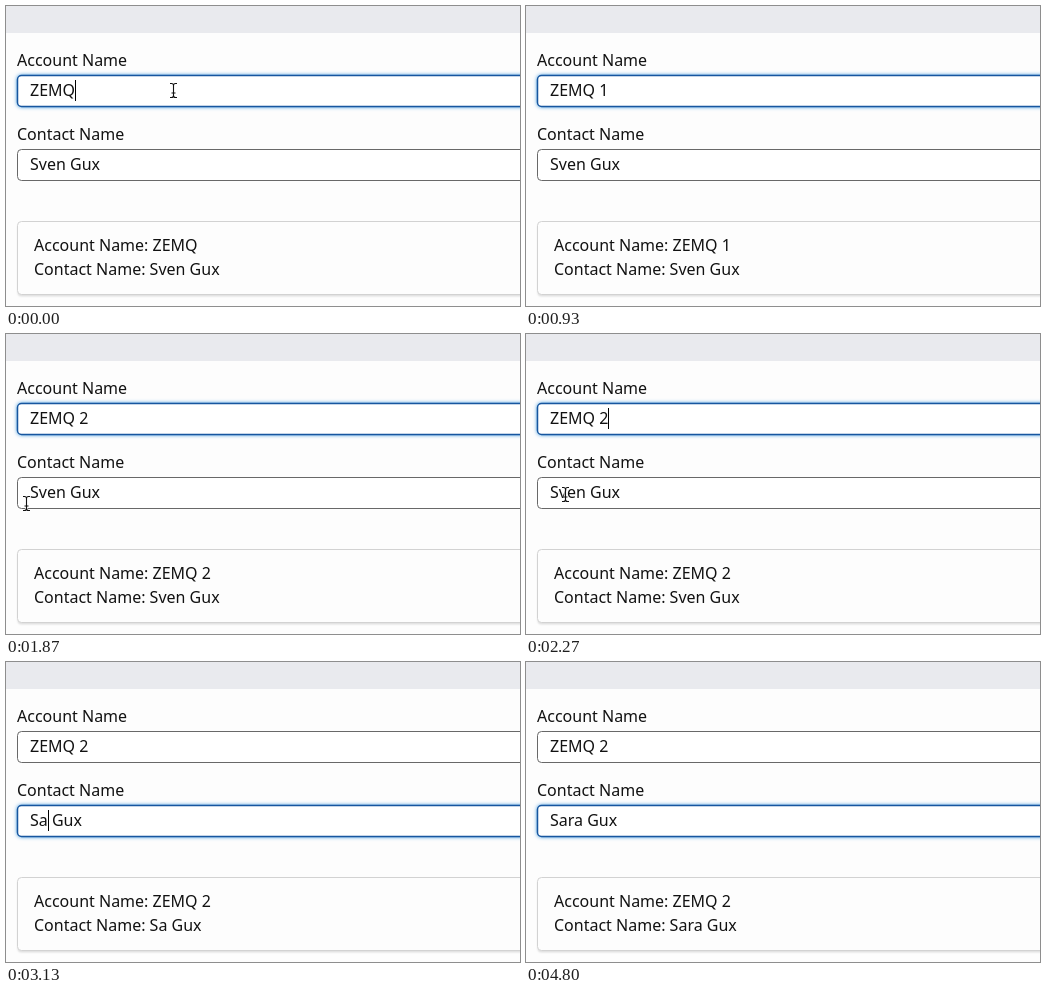
Animation, 514 px wide and 300 px high, one loop 4.96 s. Source, as an HTML page with a canvas:

```html
<!DOCTYPE html>
<html lang="en">
<head>
<meta charset="utf-8">
<title>Live form preview</title>
<style>
html, body { margin: 0; width: 100%; height: 100%; overflow: hidden; background: #fdfdfd; }
canvas { display: block; width: 514px; height: 300px; }
</style>
</head>
<body>
<canvas></canvas>
<script>
const LOOP = 4960, TEXT_X = 24;
const canvas = document.querySelector('canvas');
const ctx = canvas.getContext('2d');
const ratio = window.devicePixelRatio || 1;
canvas.width = 514 * ratio;
canvas.height = 300 * ratio;

// [time, value, characters before the caret]
const accountEdits = [
  [0, 'ZEMQ', 4], [230, 'ZEMQ ', 5], [430, 'ZEMQ 1', 6],
  [970, 'ZEMQ ', 5], [1100, 'ZEMQ 2', 6]
];
const contactEdits = [
  [0, 'Sven Gux', 4], [3000, 'S Gux', 1], [3100, 'Sa Gux', 2],
  [3200, 'Sar Gux', 3], [3300, 'Sara Gux', 4]
];
const FOCUS_SWITCH = 2300, SELECT_START = 2400, SELECT_END = 3000;

// Each visible stretch of the pointer: [time, x, y]
const pointerPaths = [
  [[0, 167, 84], [230, 167, 84]],
  [[1370, 167, 84], [1500, 182, 159], [1600, 182, 159], [1870, 20, 169],
   [1900, 20, 169], [2230, 39, 160], [3000, 39, 160]],
  [[4070, 40, 160], [4330, 480, 128]]
];

const latest = (edits, t) => edits.filter(e => e[0] <= t).pop();

function text(string, x, baseline) {
  ctx.fillStyle = '#121212';
  ctx.fillText(string, x, baseline);
}

function box(x, y, height, fill, stroke, width = 1) {
  ctx.beginPath();
  ctx.roundRect(x, y, 540, height, 4);
  ctx.fillStyle = fill;
  ctx.fill();
  ctx.shadowColor = 'transparent';
  ctx.strokeStyle = stroke;
  ctx.lineWidth = width;
  ctx.stroke();
}

function field(label, top, edit, focused, selected, t) {
  const [editTime, value, caret] = edit;
  text(label, 11, top - 9);
  if (focused) {
    ctx.shadowColor = '#0176d3';
    ctx.shadowBlur = 4 * ratio;
  }
  box(11.5, top + 0.5, 31, '#fff', focused ? '#17569f' : '#686868', focused ? 1.5 : 1);

  const caretX = TEXT_X + ctx.measureText(value.slice(0, caret)).width;
  if (selected) {
    ctx.fillStyle = '#e3e3e3';
    ctx.fillRect(TEXT_X, top + 5, caretX - TEXT_X, 22);
  }
  text(value, TEXT_X, top + 21);
  if (focused && !selected && (t - editTime) % 1000 < 500) {
    ctx.fillStyle = '#000';
    ctx.fillRect(Math.round(caretX), top + 5, 1, 21);
  }
}

function pointerAt(t) {
  const path = pointerPaths.find(p => t >= p[0][0] && t < p[p.length - 1][0]);
  if (!path) return null;
  const i = path.findIndex(p => p[0] > t);
  const [t0, x0, y0] = path[i - 1], [t1, x1, y1] = path[i];
  const u = (t - t0) / (t1 - t0), eased = u * u * (3 - 2 * u);
  return [x0 + (x1 - x0) * eased, y0 + (y1 - y0) * eased];
}

function drawPointer([x, y]) {
  const beam = new Path2D(
    'M-3.5-7H-2Q0-7 0-5Q0-7 2-7H3.5M0-5V5M-3.5 7H-2Q0 7 0 5Q0 7 2 7H3.5M-2 2.5H2');
  ctx.save();
  ctx.translate(Math.round(x) + 0.5, Math.round(y) + 0.5);
  for (const [color, width] of [['rgba(255,255,255,.8)', 2.6], ['#111', 1.1]]) {
    ctx.strokeStyle = color;
    ctx.lineWidth = width;
    ctx.stroke(beam);
  }
  ctx.restore();
}

function draw(t) {
  const account = latest(accountEdits, t), contact = latest(contactEdits, t);
  const onContact = t >= FOCUS_SWITCH;
  const selected = t >= SELECT_START && t < SELECT_END;
  const clicking = onContact && t < SELECT_START;

  ctx.setTransform(ratio, 0, 0, ratio, 0, 0);
  ctx.font = '16px "Noto Sans", "Open Sans", sans-serif';
  ctx.fillStyle = '#fdfdfd';
  ctx.fillRect(0, 0, 514, 300);
  ctx.fillStyle = '#e9eaee';
  ctx.fillRect(0, 0, 514, 27);

  field('Account Name', 69, account, !onContact, false, t);
  // While the mouse is pressed the caret sits beneath the pointer.
  field('Contact Name', 143, clicking ? [t - 500, contact[1], 0] : contact, onContact, selected, t);

  ctx.shadowColor = 'rgba(0,0,0,.12)';
  ctx.shadowBlur = 2 * ratio;
  ctx.shadowOffsetY = 2 * ratio;
  box(11.5, 215.5, 73, '#fdfdfd', '#d2d2d2');
  ctx.shadowOffsetY = ctx.shadowBlur = 0;
  text('Account Name: ' + account[1], 28, 245);
  text('Contact Name: ' + contact[1], 28, 269);

  const pointer = pointerAt(t);
  if (pointer) drawPointer(pointer);
}

function tick() {
  draw(performance.now() % LOOP);
  requestAnimationFrame(tick);
}
tick();
</script>
</body>
</html>
```
